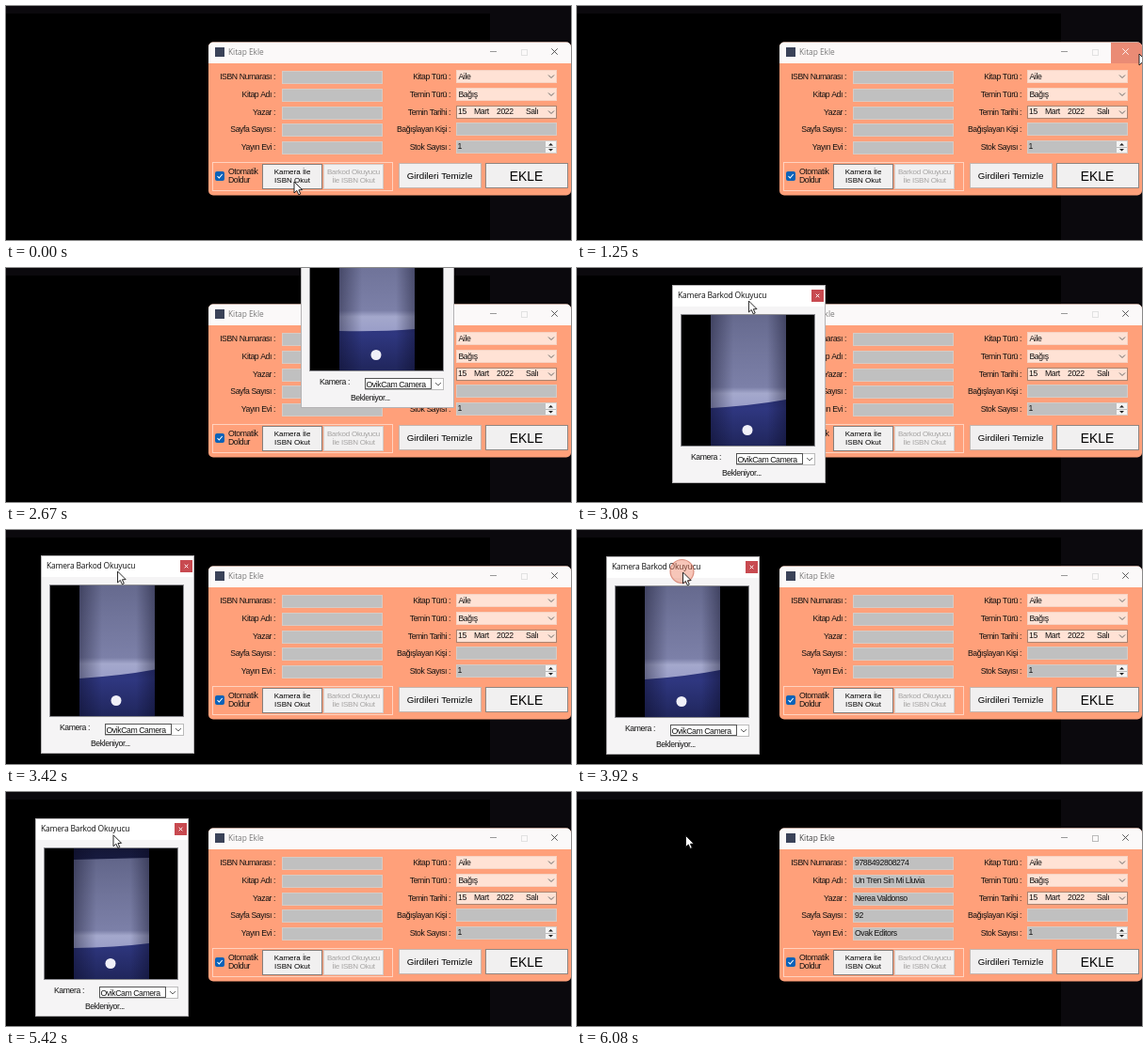
Animation, 600 px wide and 249 px high, one loop 6.16 s. Source, as an HTML page with a canvas:

```html
<!DOCTYPE html>
<html lang="tr">
<head>
<meta charset="utf-8">
<title>Kitap Ekle</title>
<style>
html, body { margin: 0; width: 100%; height: 100%; overflow: hidden; background: #000; }
canvas { display: block; width: 600px; height: 249px; }
</style>
</head>
<body>
<canvas id="stage" width="600" height="249"></canvas>
<script>
const ctx = document.getElementById('stage').getContext('2d');
const LOOP = 6160, STEP = 1000 / 12;
const SANS = '"Liberation Sans", Arial, sans-serif';
const UI = '"Open Sans", "Noto Sans", sans-serif';

const LEFT = [
  ['ISBN Numarası :', '9788492808274'],
  ['Kitap Adı :', 'Un Tren Sin Mi Lluvia'],
  ['Yazar :', 'Nerea Valdonso'],
  ['Sayfa Sayısı :', '92'],
  ['Yayın Evi :', 'Ovak Editors']
];
const RIGHT = ['Kitap Türü :', 'Temin Türü :', 'Temin Tarihi :', 'Bağışlayan Kişi :', 'Stok Sayısı :'];
const rowY = i => Math.round(75 + i * 18.75);

// Keyframes: [time, value, value, ...]
const DRAG = [[2500, 313, -62], [2667, 313, -62], [2833, 232, -30], [3083, 101, 18], [3250, 58, 24], [3417, 37, 27], [3583, 31, 28]];
const POINTER = [[1083, 306, 187], [1167, 420, 133], [1250, 597, 51], [1333, 690, 8]];
// paper top, bottom left, bottom right
const PAPER = [[2500, 20, 129, 127], [2667, 20, 129, 127], [3083, 20, 131, 122], [3917, 20, 131, 121],
  [4417, 22, 133, 124], [4750, 43, 138, 132], [5083, 44, 138, 133]];

const clamp = v => Math.max(0, Math.min(1, v));

function track(keys, t) {
  if (t <= keys[0][0]) return keys[0].slice(1);
  for (let i = 1; i < keys.length; i++) {
    const a = keys[i - 1], b = keys[i];
    if (t <= b[0]) {
      const k = (t - a[0]) / (b[0] - a[0]);
      return a.slice(1).map((v, j) => v + (b[j + 1] - v) * k);
    }
  }
  return keys[keys.length - 1].slice(1);
}

function rect(x, y, w, h, fill) {
  ctx.fillStyle = fill;
  ctx.fillRect(x, y, w, h);
}

function frame(x, y, w, h, color) {
  ctx.strokeStyle = color;
  ctx.lineWidth = 1;
  ctx.strokeRect(x + .5, y + .5, w - 1, h - 1);
}

function text(s, x, y, { size = 8.7, color = '#111', align = 'left', font = SANS, gap = -.42 } = {}) {
  ctx.font = `${size}px ${font}`;
  ctx.letterSpacing = gap + 'px';
  ctx.textAlign = align;
  ctx.fillStyle = color;
  ctx.fillText(s, x, y);
}

function path(points, color, width = 1) {
  ctx.beginPath();
  points.forEach(([x, y], i) => i ? ctx.lineTo(x, y) : ctx.moveTo(x, y));
  ctx.strokeStyle = color;
  ctx.lineWidth = width;
  ctx.stroke();
}

function polygon(points, fill) {
  ctx.beginPath();
  points.forEach(p => ctx.lineTo(...p));
  ctx.closePath();
  ctx.fillStyle = fill;
  ctx.fill();
}

function disc(x, y, r, fill) {
  ctx.beginPath();
  ctx.arc(x, y, r, 0, 7);
  ctx.fillStyle = fill;
  ctx.fill();
}

function gradient(x0, y0, x1, y1, ...stops) {
  const g = ctx.createLinearGradient(x0, y0, x1, y1);
  stops.forEach(([at, color]) => g.addColorStop(at, color));
  return g;
}

function cross(x, y, r, color, width) {
  path([[x - r, y - r], [x + r, y + r]], color, width);
  path([[x + r, y - r], [x - r, y + r]], color, width);
}

const chevron = (x, y) => path([[x - 3, y - 1.5], [x, y + 1.5], [x + 3, y - 1.5]], '#666');

function grayField(x, y, w) {
  rect(x, y, w, 14, '#c0c0c0');
  frame(x, y, w, 14, '#d6cbc5');
}

function button(x, y, w, h, border) {
  rect(x, y, w, h, '#f1f0f0');
  frame(x, y, w, h, border);
}

function titleBar(t) {
  rect(215, 38, 385, 23, '#fbf9f9');
  rect(222, 44, 10, 10, '#3a4258');
  text('Kitap Ekle', 236, 52, { size: 8.3, font: UI, gap: 0, color: t >= 5750 ? '#444' : '#777' });
  path([[514, 48.5], [521, 48.5]], '#999');
  frame(547, 46, 7, 7, t >= 5750 ? '#bbb' : '#e2e2e2');
  const hover = t < 1245 ? 0 : .85 * (1 - clamp((t - 1250) / 330));
  if (hover) rect(567, 39, 33, 22, `rgba(232,120,95,${hover})`);
  cross(582.5, 48.5, 3.2, hover > .4 ? '#fff' : '#444', .9);
}

function form(filled) {
  LEFT.forEach(([label, value], i) => {
    const y = rowY(i);
    text(label, 286, y + 3, { align: 'right' });
    grayField(293, y - 6, 107);
    if (filled) text(value, 295, y + 3);
  });

  RIGHT.forEach((label, i) => {
    const y = rowY(i);
    text(label, 472, y + 2.5, { align: 'right' });
    if (i < 3) {
      rect(478, y - 7, 107, 14, '#ffe2d5');
      frame(478, y - 7, 107, 14, i === 2 ? '#a98472' : '#f6d3c3');
      chevron(579, y);
    } else {
      grayField(478, y - 7, 107);
    }
  });
  text('Aile', 480.5, 78);
  text('Bağış', 480.5, 97);
  [['15', 480], ['Mart', 497], ['2022', 521], ['Salı', 552]].forEach(([s, x]) => text(s, x, 115));
  text('1', 479.5, 152);
  rect(573, 144, 11, 12, '#f4f4f4');
  rect(573, 150, 11, 1, '#bbb');
  polygon([[576, 148.5], [578.5, 146], [581, 148.5]], '#222');
  polygon([[576, 152], [578.5, 154.5], [581, 152]], '#222');
}

function actions() {
  frame(219, 166, 192, 31, '#ffd2bf');
  ctx.beginPath();
  ctx.roundRect(222, 176, 10, 10, 2);
  ctx.fillStyle = '#0b62b8';
  ctx.fill();
  path([[224.5, 181], [226.3, 183], [229.7, 179]], '#fff', 1.1);
  text('Otomatik', 236, 179);
  text('Doldur', 236, 188);

  const mid = { align: 'center', size: 8, gap: 0, color: '#000' };
  button(272, 168, 64, 27, '#857d7a');
  text('Kamera İle', 304, 178.5, mid);
  text('ISBN Okut', 304, 188, mid);
  button(337, 168, 64, 27, '#d2cac6');
  const off = { ...mid, gap: -.22, color: '#a5a3a2' };
  text('Barkod Okuyucu', 369, 178.5, off);
  text('İle ISBN Okut', 369, 188, off);
  button(417, 167, 88, 27, '#c4b5ae');
  text('Girdileri Temizle', 460.5, 184, { ...mid, size: 9.8 });
  button(509, 167, 88, 27, '#8f8580');
  text('EKLE', 552.5, 186, { ...mid, size: 13.8 });
}

function mainWindow(t) {
  ctx.save();
  ctx.beginPath();
  ctx.roundRect(215, 38.5, 385, 163, 5);
  ctx.clip();
  rect(215, 38, 385, 164, '#ffa07a');
  titleBar(t);
  form(t >= 5830);
  actions();
  ctx.restore();
}

function cameraView(t) {
  const [top, left, right] = track(PAPER, t);
  rect(9, 31, 143, 141, '#8d8d92');
  rect(10, 32, 141, 139, '#000');
  ctx.save();
  ctx.beginPath();
  ctx.rect(41, 32, 80, 139);
  ctx.clip();

  rect(41, 32, 80, 139, gradient(0, 32, 0, 171, [0, '#141737'], [.72, '#2f3780'], [1, '#20265c']));
  const paper = gradient(0, top, 0, left,
    [0, '#62668a'], [.4, '#70749a'], [.8, '#7c80a8'], [.86, '#a4a8cc'], [1, '#9a9ec8']);
  ctx.beginPath();
  ctx.moveTo(41, top);
  ctx.lineTo(121, top - 2);
  ctx.lineTo(121, right);
  ctx.quadraticCurveTo(85, (left + right) / 2 + 2, 41, left);
  ctx.fillStyle = paper;
  ctx.fill();

  // darker towards both sides of the picture
  const edge = 'rgba(8,8,30,.4)', clear = 'rgba(8,8,30,0)';
  rect(41, 32, 80, 139, gradient(41, 0, 121, 0, [0, edge], [.3, clear], [.75, clear], [1, edge]));
  disc(80, 154.5, 5.5, '#f0f0f8');
  ctx.restore();
}

function dialog(t) {
  if (t < 2495 || t >= 5910) return;
  const [x, y] = track(DRAG, t);
  ctx.save();
  ctx.globalAlpha = 1 - clamp((t - 5667) / 250);
  ctx.translate(Math.round(x), Math.round(y));
  rect(0, 0, 163, 211, '#f5f4f5');
  rect(0, 0, 163, 23, '#fff');
  frame(0, 0, 163, 211, '#b5b3b5');
  text('Kamera Barkod Okuyucu', 6, 14, { size: 8.5, font: UI, gap: -.2 });
  rect(148, 5, 13, 13, '#c84a50');
  cross(154.5, 11.5, 1.8, '#fff', 1);
  cameraView(t);
  text('Kamera :', 20, 186);
  rect(68, 179, 84, 13, '#fff');
  frame(68, 179, 84, 13, '#bbb');
  frame(68, 179, 71, 12, '#555');
  text('OvikCam Camera', 69.5, 188.5);
  chevron(146, 185.5);
  text('Bekleniyor...', 53, 202.5);
  ctx.restore();
}

function ripple(t, start, x, y) {
  const k = (t - start) / 580;
  if (k < 0 || k >= 1) return;
  const a = 1 - k;
  disc(x, y, 12.5, `rgba(235,120,90,${.5 * a})`);
  ctx.strokeStyle = `rgba(200,95,75,${.75 * a})`;
  ctx.lineWidth = 1.2;
  ctx.stroke();
}

function pointerAt(t) {
  if (t < 1400) return track(POINTER, t);
  if (t < 2660) return null;
  const [x, y] = track(DRAG, t);
  const nudge = 3 * clamp((t - 5333) / 167);
  return [x + 81.5 + nudge, y + 17 + nudge / 2];
}

function pointer(t) {
  const at = pointerAt(t);
  if (!at) return;
  ctx.save();
  ctx.translate(...at);
  polygon([[0, 0], [0, 12], [2.8, 9.4], [4.8, 13.8], [6.8, 12.9], [4.9, 8.8], [8.6, 8.6]], '#fff');
  ctx.strokeStyle = '#111';
  ctx.lineWidth = .9;
  ctx.lineJoin = 'round';
  ctx.stroke();
  ctx.restore();
}

function draw(now) {
  const t = Math.floor((now % LOOP + 5) / STEP) * STEP;
  rect(0, 0, 600, 249, '#0b090d');
  rect(0, 8, 514, 241, '#000');
  mainWindow(t);
  dialog(t);
  ripple(t, 495, 306, 187);
  ripple(t, 3830, 111.5, 44);
  pointer(t);
}

const start = performance.now();
function tick() {
  draw(performance.now() - start);
  requestAnimationFrame(tick);
}
tick();
</script>
</body>
</html>
```
